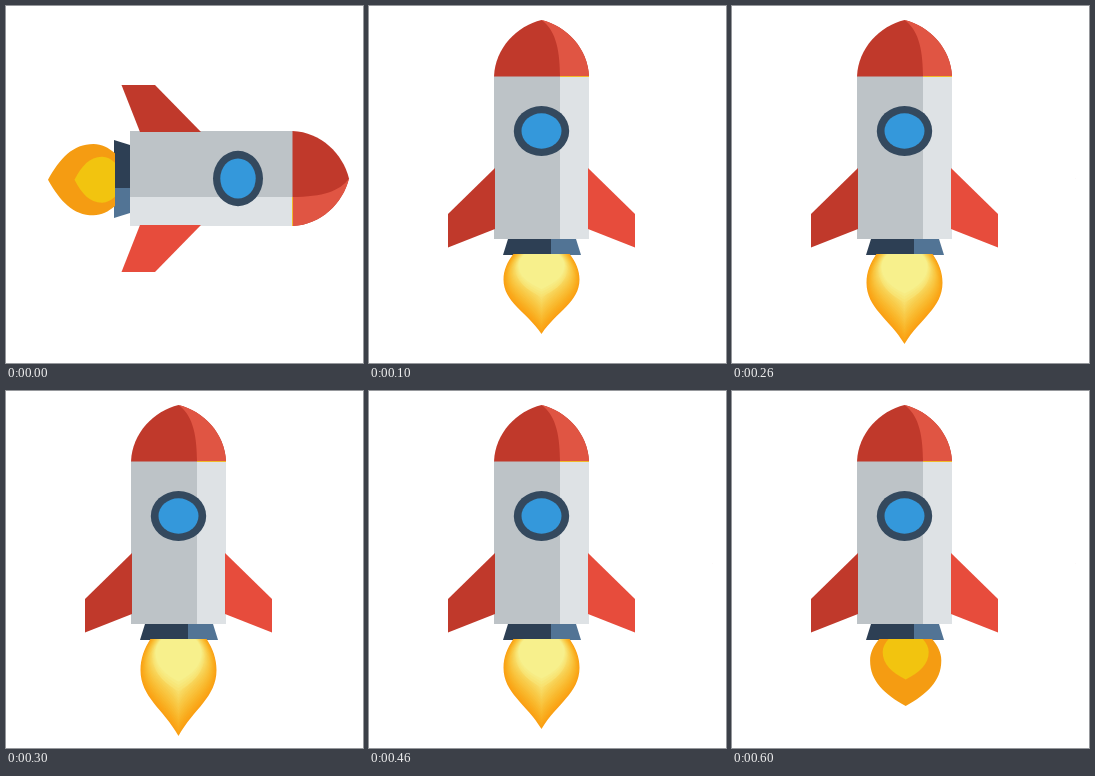
An HTML page for the animation above (0.7 s loop, 357 px wide and 357 px high).

```html
<!DOCTYPE html>
<html lang="en">
<head>
<meta charset="utf-8">
<title>Rocket</title>
<style>
  html, body { margin: 0; width: 100%; height: 100%; overflow: hidden; background: #fff; }
  svg { display: block; width: 100%; height: 100%; }
</style>
</head>
<body>
<svg viewBox="0 0 357 357">
  <g id="rocket">
    <path fill="#2d3f54" d="M139 233H182V249H134Z"/>
    <path fill="#527495" d="M182 233H207L212 249H182Z"/>
    <g id="flame"></g>
    <path fill="#bdc3c7" d="M125 70H191V233H125Z"/>
    <path fill="#dee2e5" d="M191 70H220V233H191Z"/>
    <path fill="#c0392b" d="M126 162L79 208V241.5L126 223Z"/>
    <path fill="#e74c3c" d="M219 162L266 208V241.5L219 223Z"/>
    <path fill="#c0392b" d="M125 70.5C126 42 148 20 172.5 14C197 20 219 42 220 70.5Z"/>
    <path fill="#e05543" d="M172.5 14C185 23 191 40 191 70.5H220C219 42 197 20 172.5 14Z"/>
    <path fill="#f1b92a" d="M191 70H220V71H191Z"/>
    <ellipse cx="172.5" cy="125" rx="27.7" ry="25" fill="#34495e"/>
    <ellipse cx="172.5" cy="125" rx="20" ry="17.7" fill="#3498db"/>
  </g>
</svg>
<script>
  const rocket = document.getElementById('rocket');
  const flame = document.getElementById('flame');
  const STEP = 100, COUNT = 7, LAYERS = 18;
  const lerp = (a, b, t) => a + (b - a) * t;

  // Teardrop hanging from the nozzle: half width w, height h
  function drop(w, h, fill, round) {
    const [y1, x2, y2] = round ? [.63, .6, .82] : [.6, .4, .72];
    const half = s => `M0 0H${.74 * s * w}C${.9 * s * w} ${.1 * h} ${s * w} ${.2 * h} ${s * w} ${.32 * h}
      C${s * w} ${y1 * h} ${s * x2 * w} ${y2 * h} 0 ${h}Z`;
    return `<path fill="${fill}" d="${half(-1)}${half(1)}"/>`;
  }

  const smallFlame = () => drop(35.6, 67, '#f59c12', true) + drop(23, 40.5, '#f2c40f', true);

  // Nested drops blending from orange to pale yellow
  function glowingFlame(h) {
    let out = '';
    for (let i = 0; i < LAYERS; i++) {
      const t = i / (LAYERS - 1);
      const rgb = [lerp(250, 247, t), lerp(160, 240, t), lerp(20, 140, t ** 1.3)].map(Math.round);
      out += drop(lerp(38, 23, t), h * lerp(1, .44, t), `rgb(${rgb})`, t > .8);
    }
    return out;
  }

  let shown = -1;
  function draw(now) {
    const pose = Math.floor(now / STEP) % COUNT;
    if (pose === shown) return;
    shown = pose;
    rocket.setAttribute('transform', pose ? '' : 'translate(357 0) rotate(90)');
    const height = [0, 80, 90, 97, 90, 80, 0][pose];
    flame.setAttribute('transform', `translate(${height ? 172.5 : 173.7} 248)`);
    flame.innerHTML = height ? glowingFlame(height) : smallFlame();
  }

  const start = performance.now();
  function tick() {
    draw(performance.now() - start);
    requestAnimationFrame(tick);
  }
  tick();
</script>
</body>
</html>
```
